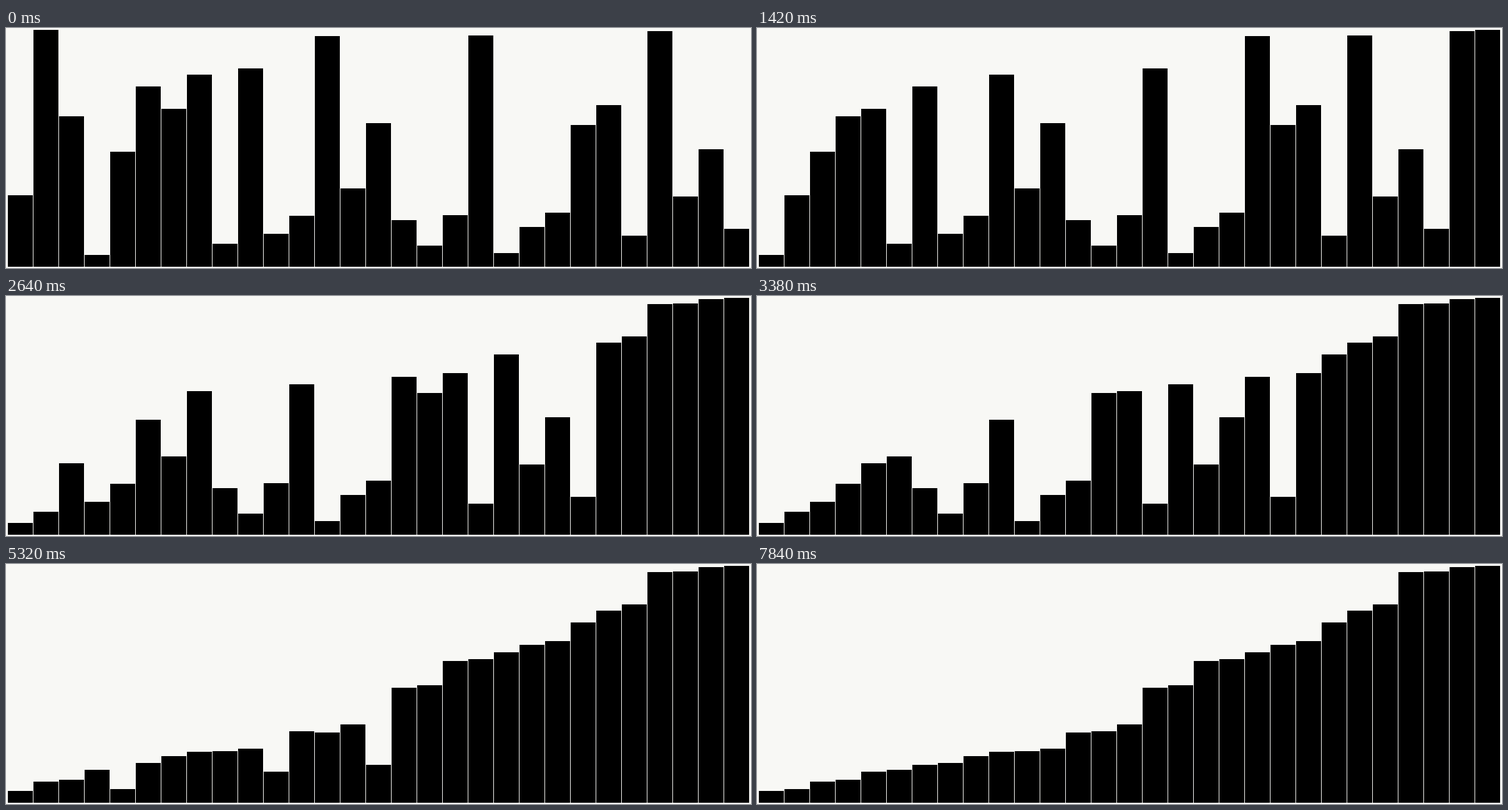
A matplotlib script that plays this animation: 1194x386 px, repeating every 8 s.

```python
import numpy as np
import matplotlib.pyplot as plt
from matplotlib.animation import FuncAnimation
from matplotlib.patches import Rectangle

WIDTH, HEIGHT, DPI = 1194, 386, 128
LOOP_MS, STEP_MS = 8000, 20
LEFT, PITCH, BAR_WIDTH, BASELINE = 3, 41, 40, 384
BACKGROUND = "#f8f8f5"

# The unsorted input: top edge of each bar, smaller is taller.
TOPS = [269, 3, 142, 365, 199, 94, 130, 75, 347, 65, 331, 302, 13, 258, 153,
        309, 350, 301, 12, 362, 320, 297, 156, 124, 334, 5, 271, 195, 323]

# Key points of the pace: time in ms -> comparisons made.
PACE = {0: 1, 980: 54, 1560: 82, 1940: 127, 2640: 183, 4360: 324,
        6320: 478, 7840: 595}


def bubble_sort_states(tops):
    """Bar order after each comparison, always scanning the full row."""
    row = list(tops)
    states = [tuple(row)]
    for _ in row:
        for j in range(len(row) - 1):
            if row[j] < row[j + 1]:
                row[j], row[j + 1] = row[j + 1], row[j]
            states.append(tuple(row))
    return states


def comparisons_at(ms):
    return int(np.interp(ms, list(PACE), list(PACE.values())) + 1e-6)


STATES = bubble_sort_states(TOPS)

fig = plt.figure(figsize=(WIDTH / DPI, HEIGHT / DPI), dpi=DPI,
                 facecolor=BACKGROUND)
ax = fig.add_axes([0, 0, 1, 1])
ax.set_xlim(0, WIDTH)
ax.set_ylim(HEIGHT, 0)
ax.axis("off")

bars = [ax.add_patch(Rectangle((LEFT + PITCH * i, top), BAR_WIDTH,
                               BASELINE - top, facecolor="black",
                               linewidth=0, antialiased=False))
        for i, top in enumerate(TOPS)]


def update(frame):
    for bar, top in zip(bars, STATES[comparisons_at(frame * STEP_MS)]):
        bar.set_y(top)
        bar.set_height(BASELINE - top)
    return bars


anim = FuncAnimation(fig, update, frames=LOOP_MS // STEP_MS,
                     interval=STEP_MS, repeat=True, repeat_delay=0,
                     blit=False)
plt.show()
```
